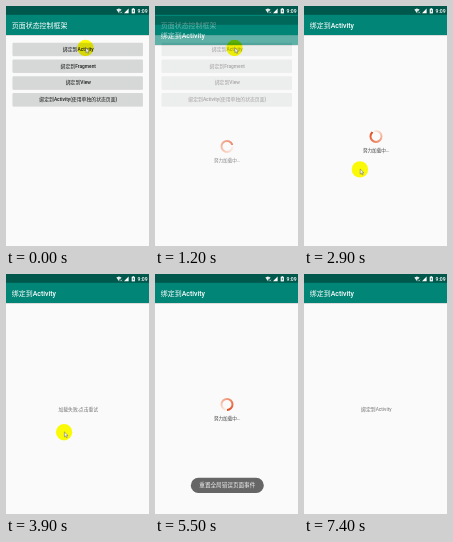
These frames come from a looping animation (143 px wide and 240 px high, 8 s). An HTML page with a canvas:

```html
<!DOCTYPE html>
<html lang="zh">
<head>
<meta charset="utf-8">
<title>页面状态控制框架</title>
<style>
  html, body { margin: 0; width: 100%; height: 100%; overflow: hidden; background: #fafafa; }
  canvas { display: block; width: 100vw; height: 100vh; }
</style>
</head>
<body>
<canvas id="stage"></canvas>
<script>
const W = 143, H = 240, LOOP = 8000, STEP = 100;
const FONT = 'Roboto, "Noto Sans CJK SC", "Noto Sans CJK", sans-serif';
const PRIMARY = '#008577', DARK = '#00574b', PAPER = '#fafafa';
const BUTTONS = ['绑定到Activity', '绑定到Fragment', '绑定到View', '绑定到Activity(使用单独的状态页面)'];

const stage = document.getElementById('stage');
const layer = document.createElement('canvas');
const screen = stage.getContext('2d');
const page = layer.getContext('2d');

const clamp = v => Math.max(0, Math.min(1, v));
const span = (t, from, to) => clamp((t - from) / (to - from));
const easeOut = (p, power) => 1 - Math.pow(1 - p, power);
const easeInOut = p => p * p * (3 - 2 * p);

function resize() {
  for (const c of [stage, layer]) {
    c.width = Math.round(innerWidth * devicePixelRatio);
    c.height = Math.round(innerHeight * devicePixelRatio);
    c.getContext('2d').setTransform(c.width / W, 0, 0, c.height / H, 0, 0);
  }
}

function rect(g, x, y, w, h, color) {
  g.fillStyle = color;
  g.fillRect(x, y, w, h);
}

function pill(g, x, y, w, h, r, color) {
  g.fillStyle = color;
  g.beginPath();
  g.roundRect(x, y, w, h, r);
  g.fill();
}

function poly(g, points, color) {
  g.fillStyle = color;
  g.beginPath();
  points.forEach(([x, y]) => g.lineTo(x, y));
  g.closePath();
  g.fill();
}

function label(g, text, x, y, size, color, weight = 400, align = 'center') {
  g.font = `${weight} ${size}px ${FONT}`;
  g.textAlign = align;
  g.textBaseline = 'alphabetic';
  g.fillStyle = color;
  g.fillText(text, x, y + size * 0.36);
}

function frame(g, title) {
  rect(g, 0, 0, W, H, PAPER);
  rect(g, 0, 29, W, 1, 'rgba(0,0,0,.12)');
  rect(g, 0, 0, W, 29, PRIMARY);
  rect(g, 0, 0, W, 8.8, DARK);
  label(g, title, 5.8, 19, 6.96, '#fff', 500, 'left');
}

function drawMenu(g, t) {
  frame(g, '页面状态控制框架');
  const press = t < 400 ? 0 : span(t, 350, 500) * (1 - span(t, 800, 1100));
  BUTTONS.forEach((text, i) => {
    const y = 36.7 + i * 16.8;
    pill(g, 6.6, y + 0.6, 130.3, 13, 0.8, 'rgba(0,0,0,.12)');
    pill(g, 6.7, y, 130.1, 13, 0.7, '#d6d7d7');
    if (i === 0 && press) pill(g, 6.7, y, 130.1, 13, 0.7, `rgba(0,0,0,${0.1 * press})`);
    label(g, text, 72.3, y + 6.4, 4.87, 'rgba(0,0,0,.87)', 500);
  });
}

function drawSpinner(g, t) {
  const x = 72, y = 130.4;
  const turn = t / 1000 * Math.PI * 2 - Math.PI / 2;
  const sweep = g.createConicGradient(turn, x, y);
  sweep.addColorStop(0, PAPER);
  sweep.addColorStop(0.08, '#fbe6dd');
  sweep.addColorStop(0.5, '#f19a7a');
  sweep.addColorStop(1, '#e2471c');
  g.strokeStyle = sweep;
  g.lineWidth = 2;
  g.beginPath();
  g.arc(x, y, 5.5, 0, Math.PI * 2);
  g.stroke();
}

function drawDetail(g, t) {
  frame(g, '绑定到Activity');
  if (t < 3500 || (t >= 4400 && t < 7400)) {
    drawSpinner(g, t);
    label(g, '努力加载中...', 72.2, 144, 4.6, '#444');
  } else {
    const text = t < 4400 ? '加载失败,点击重试' : '绑定到Activity';
    label(g, text, 72.3, 135, 4.87, '#757575');
  }
}

function drawStatus(g) {
  poly(g, [[110.3, 3.4], [112.9, 2.4], [115.6, 3.4], [113, 7.2]], '#e6efed');
  g.strokeStyle = DARK;
  g.lineWidth = 1.5;
  g.strokeRect(114.2, 5.6, 1.8, 1.8);
  g.strokeStyle = '#fff';
  g.lineWidth = 0.5;
  g.beginPath();
  g.moveTo(114.3, 5.6); g.lineTo(116, 7.3);
  g.moveTo(116, 5.6); g.lineTo(114.3, 7.3);
  g.stroke();
  poly(g, [[118, 7.2], [122.6, 7.2], [122.6, 2.5]], '#fff');
  rect(g, 126.6, 2.2, 1.4, 0.7, '#fff');
  rect(g, 125.7, 2.8, 3.2, 4.6, '#fff');
  poly(g, [[127.7, 3.3], [126.4, 5.3], [127.2, 5.3], [126.9, 6.8], [128.2, 4.8], [127.4, 4.8]], DARK);
  label(g, '9:09', 141.6, 5, 5.1, '#fff', 500, 'right');
}

function drawToast(g, t) {
  const alpha = span(t, 4480, 4680) * (1 - span(t, 6550, 7050));
  if (!alpha) return;
  g.save();
  g.globalAlpha = alpha;
  pill(g, 35.8, 203.8, 73, 15.2, 7.6, '#666');
  label(g, '重置全局错误页面事件', 72.3, 211.4, 5.6, '#eee');
  g.restore();
}

// [start, end, x, y]: each move glides to its point
const MOVES = [
  [1650, 1990, 57.4, 164],
  [2550, 2800, 55.9, 163.4],
  [3780, 4200, 67, 137.3],
  [4750, 5250, 36, 252]
];

function pointer(t) {
  let x = 79.5, y = 42;
  for (const [from, to, tx, ty] of MOVES) {
    const p = easeInOut(span(t, from, to));
    x += (tx - x) * p;
    y += (ty - y) * p;
  }
  return [x, y];
}

function drawPointer(g, t) {
  const [x, y] = pointer(t);
  g.save();
  g.globalCompositeOperation = 'multiply';
  g.fillStyle = '#ffff08';
  g.beginPath();
  g.arc(x, y, 8.2, 0, Math.PI * 2);
  g.fill();
  g.restore();

  g.save();
  g.translate(x + 0.3, y - 0.3);
  poly(g, [[0, 0], [0, 5], [1.2, 4], [2, 5.8], [2.9, 5.4], [2.1, 3.7], [3.7, 3.6]], '#f4f4f4');
  g.strokeStyle = '#444';
  g.lineWidth = 0.4;
  g.stroke();
  g.restore();
}

function draw(t) {
  const open = t - 1157;
  if (open < 200) drawMenu(screen, t);
  if (open > 0) {
    drawDetail(page, t);
    const shift = 0.08 * H * (1 - easeOut(clamp(open / 350), 5));
    screen.save();
    screen.globalAlpha = easeOut(clamp(open / 200), 4);
    screen.drawImage(layer, 0, shift, W, H);
    screen.restore();
  }
  drawStatus(screen);
  drawToast(screen, t);
  drawPointer(screen, t);
}

function tick(now) {
  draw(Math.floor(now % LOOP / STEP) * STEP);
  requestAnimationFrame(tick);
}

addEventListener('resize', resize);
resize();
requestAnimationFrame(tick);
</script>
</body>
</html>
```
